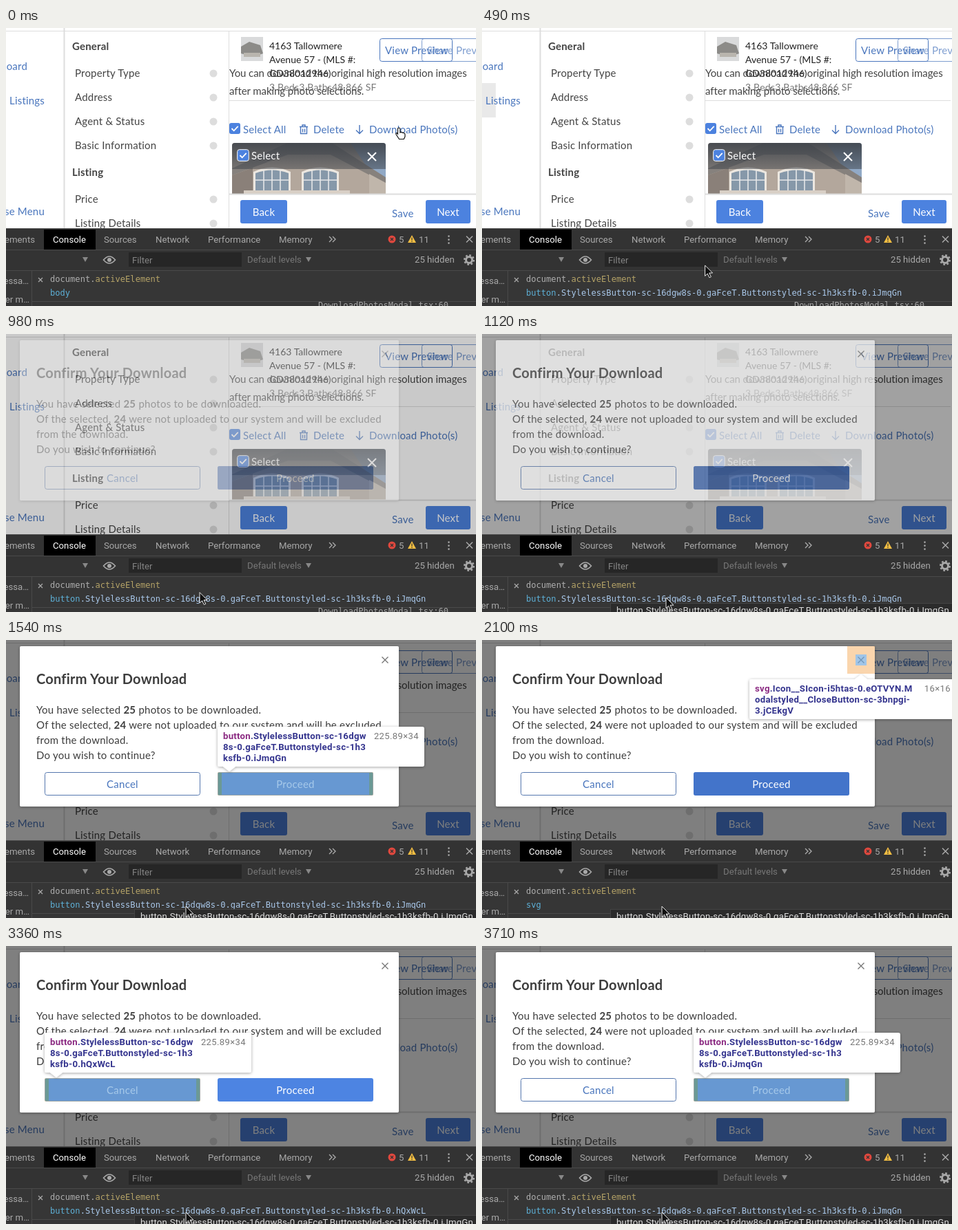
An HTML page that plays this animation: 682 by 404 pixels, repeating every 3780 ms.

```html
<!DOCTYPE html>
<html lang="en">
<head>
<meta charset="utf-8">
<title>Download dialog focus</title>
<style>
html, body { margin: 0; width: 100%; height: 100%; overflow: hidden; background: #fff; }
svg { display: block; }
text { white-space: pre; }
.page { font: 15px Lato, sans-serif; letter-spacing: .2px; fill: #444; }
.bold { font-weight: 700; }
.blue { fill: #4a76bd; }
.white { fill: #fff; }
.mid { text-anchor: middle; }
.end { text-anchor: end; }
.addr { font-size: 14px; letter-spacing: 0; fill: #222; }
.facts { font-size: 14px; fill: #777; }
.body { letter-spacing: -.08px; }
.modal { font: 15px Lato, sans-serif; letter-spacing: .25px; fill: #3d3d3d; }
.title { font-size: 20px; font-weight: 700; letter-spacing: .25px; }
.ui { font: 13.2px Roboto, sans-serif; fill: #a9a9a9; }
.mono { font: 12.08px "DejaVu Sans Mono", monospace; fill: #a9c8ea; }
.tag { fill: #5db0d7; }
.tip { font: 13.2px Roboto, sans-serif; }
.long { letter-spacing: .17px; }
.sel { font: 700 13.2px Roboto, sans-serif; letter-spacing: .27px; fill: #34348e; }
.el { fill: #8b2a82; }
.dim { font: 13px Roboto, sans-serif; letter-spacing: .4px; fill: #777; }
.line { fill: none; stroke: #ddd; }
.icon { fill: none; stroke: #4a76bd; stroke-width: 1.4; }
.btn { fill: #4c82df; }
</style>
</head>
<body>
<svg width="682" height="404" viewBox="0 0 682 404">
<defs>
  <linearGradient id="shade" x2="0" y2="1">
    <stop stop-color="#3c4148" stop-opacity=".9"/><stop offset="1" stop-color="#3c4148" stop-opacity=".5"/>
  </linearGradient>
  <filter id="shadow" x="-10%" y="-20%" width="120%" height="150%">
    <feDropShadow dx="0" dy="1" stdDeviation="2" flood-opacity=".35"/>
  </filter>
  <clipPath id="photo"><path d="M328 242V171q0-4 4-4h215q4 0 4 4v71z"/></clipPath>
  <g id="check">
    <rect width="16" height="16" rx="3" fill="#4c82df"/>
    <path d="M3.5 8l3.2 3.3 6-6.5" fill="none" stroke="#fff" stroke-width="1.8"/>
  </g>
  <g id="window">
    <path d="M-3 35V8q27-13 54 0v27z" fill="#ece7e0"/>
    <path d="M0 35V10q24-9 48 0v25z" fill="#8698a9"/>
    <path d="M24 4v31M12 6v29M36 6v29M0 20h48" stroke="#e6e8e9" stroke-width="1.6"/>
  </g>
</defs>

<g class="page">
  <rect width="682" height="292" fill="#fff"/>
  <path class="line" d="M0 4.5H682M324 105.5H680M323.5 5V291"/>
  <path class="line" d="M84.5 0V291" stroke-width="2"/>
  <rect id="hover" y="80" width="20" height="50" fill="#e9e9e9"/>
  <text class="blue end" x="31" y="61">Dashboard</text>
  <text class="blue" x="5" y="111">Listings</text>
  <text class="blue end" x="56" y="272">Close Menu</text>
  <text class="bold" x="96" y="32">General</text>
  <text class="bold" x="96" y="215">Listing</text>
  <g id="menu"></g>

  <rect x="341" y="13" width="32" height="35" fill="#d9dadb"/>
  <path d="M341 27l12-7 16 5 4 12-14 5-18-5z" fill="#8c8b88"/>
  <path d="M345 36h24v6h-24z" fill="#b9b5ae"/>
  <text class="addr" x="382" y="31">4163 Tallowmere</text>
  <text class="addr" x="382" y="51">Avenue 57 - (MLS #:</text>
  <text class="addr" x="382" y="71">GD38012946)</text>
  <text class="facts" x="382" y="91">3 Beds3 Baths48,866 SF</text>
  <text class="body" x="324" y="71">You can download the original high resolution images</text>
  <text class="body" x="324" y="97">after making photo selections.</text>
  <rect x="542.5" y="15.5" width="105" height="33" rx="3" fill="none" stroke="#4a76bd"/>
  <text class="blue" x="550" y="38">View Preview</text>
  <g opacity=".7">
    <rect x="603.5" y="15.5" width="110" height="33" rx="3" fill="none" stroke="#4a76bd"/>
    <text class="blue" x="611" y="38">Share Preview</text>
  </g>

  <use href="#check" x="324" y="138"/>
  <text class="blue" x="344" y="153">Select All</text>
  <path class="icon" d="M426 143.5h12M430 143v-2h4v2M427.5 144v9.5h9V144M430.5 146.5v5M433.5 146.5v5"/>
  <text class="blue" x="446" y="153">Delete</text>
  <path class="icon" d="M513 141v12M508 148.5l5 5 5-5"/>
  <text class="blue" x="527" y="153">Download Photo(s)</text>

  <g clip-path="url(#photo)">
    <rect x="328" y="167" width="223" height="75" fill="#b3a79c"/>
    <path d="M500 167h51v75h-22v-32z" fill="#91a9c6"/>
    <path d="M328 204l80-37h65l78 50v9l-80-42h-62l-81 30z" fill="#86817d"/>
    <path d="M328 214l30-11v39h-30z" fill="#8a8079"/>
    <path d="M527 212l24 13v17h-24z" fill="#c0b6ab"/>
    <path d="M345 236h154v6H345z" fill="#d8cfc5"/>
    <use href="#window" x="362" y="201"/>
    <use href="#window" x="432" y="201"/>
    <rect x="328" y="167" width="223" height="38" fill="url(#shade)"/>
  </g>
  <use href="#check" x="336" y="177"/>
  <rect x="335.7" y="176.7" width="16.6" height="16.6" rx="3" fill="none" stroke="#fff"/>
  <text class="white" x="356" y="191">Select</text>
  <path d="M525 181l12 12m0-12l-12 12" stroke="#fff" stroke-width="2"/>

  <path class="line" d="M324 241.5H682" stroke-width="2"/>
  <rect class="btn" x="340" y="250" width="68" height="34" rx="3"/>
  <text class="white mid" x="374" y="273">Back</text>
  <text class="blue" x="560" y="275">Save</text>
  <rect class="btn" x="609" y="250" width="65" height="34" rx="3"/>
  <text class="white mid" x="641.5" y="273">Next</text>
</g>

<rect id="veil" width="682" height="292"/>

<g id="modal" class="modal">
  <rect x="20" y="9" width="550" height="233" rx="2" fill="#fff" filter="url(#shadow)"/>
  <path d="M545.5 24.5l9 9m0-9l-9 9" stroke="#777" stroke-width="1.4"/>
  <text class="title" x="44" y="64">Confirm Your Download</text>
  <text x="44" y="107">You have selected <tspan class="bold">25</tspan> photos to be downloaded.</text>
  <text x="44" y="129">Of the selected, <tspan class="bold">24</tspan> were not uploaded to our system and will be excluded</text>
  <text x="44" y="151">from the download.</text>
  <text x="44" y="173">Do you wish to continue?</text>
  <rect x="56.5" y="192.5" width="225" height="33" rx="3" fill="#fff" stroke="#5577ae"/>
  <text class="blue mid" x="169" y="215">Cancel</text>
  <g id="cancelFocus">
    <rect x="56" y="192" width="226" height="34" rx="3" fill="#3b66b4"/>
    <text class="white mid" x="169" y="215">Cancel</text>
  </g>
  <rect x="307" y="192" width="226" height="34" rx="3" fill="#4d84e2"/>
  <rect id="proceedFocus" x="307" y="192" width="226" height="34" rx="3" fill="#3b66b4"/>
  <text class="white mid" x="420" y="215">Proceed</text>
</g>

<g id="btnMark">
  <rect x="307.5" y="192.5" width="225" height="33" fill="none" stroke="#ffe599" stroke-opacity=".5"/>
  <path d="M308 193h224v32H308zM313 193v32h214v-32z" fill="#93c47d" fill-opacity=".55" fill-rule="evenodd"/>
  <rect x="313" y="193" width="214" height="32" fill="#7db0e0" fill-opacity=".68"/>
  <path d="M310 126h294q3 0 3 3v52q0 3-3 3H333l-9 7-9-7h-5q-3 0-3-3v-52q0-3 3-3z" fill="#fff" filter="url(#shadow)"/>
  <text class="sel" x="315" y="144"><tspan class="el">button</tspan>.StylelessButton-sc-16dgw</text>
  <text class="sel" x="315" y="160">8s-0.gaFceT.Buttonstyled-sc-1h3</text>
  <text class="sel" x="315" y="176">ksfb-0.<tspan id="markHash"></tspan></text>
  <text class="dim end" x="599" y="144">225.89×34</text>
</g>

<g id="svgMark">
  <path d="M530 9h40v40h-40zM542 21v16h16V21z" fill="#f6b26b" fill-opacity=".55" fill-rule="evenodd"/>
  <rect x="542" y="21" width="16" height="16" fill="#6fa8dc" fill-opacity=".66"/>
  <path d="M391 57h150l9-7 9 7h133v58H391q-3 0-3-3V60q0-3 3-3z" fill="#fff" filter="url(#shadow)"/>
  <text class="sel" x="396" y="75"><tspan class="el">svg</tspan>.Icon__SIcon-i5htas-0.eOTVYN.M</text>
  <text class="sel" x="396" y="91">odalstyled__CloseButton-sc-3bnpgi-</text>
  <text class="sel" x="396" y="107">3.jCEkgV</text>
  <text class="dim end" x="680" y="75">16×16</text>
</g>

<g class="ui">
  <rect y="291" width="682" height="113" fill="#363636"/>
  <rect y="291" width="682" height="61" fill="#333"/>
  <path d="M0 291.5H682M0 322.5H682M0 352.5H682M37.5 352V404M38 397.5H682" stroke="#4a4a4a"/>
  <rect x="55" y="293" width="75" height="29" fill="#000"/>
  <text class="end" x="42" y="312">Elements</text>
  <text class="white" x="68" y="312">Console</text>
  <text x="142" y="312">Sources</text>
  <text x="217" y="312">Network</text>
  <text x="293" y="312">Performance</text>
  <text x="396" y="312">Memory</text>
  <path d="M469 303l4 4-4 4m5-8l4 4-4 4" fill="none" stroke="#a9a9a9" stroke-width="1.4"/>
  <circle cx="560" cy="307" r="5.5" fill="#e0483e"/>
  <path d="M558 305l4 4m0-4l-4 4" stroke="#333" stroke-width="1.2"/>
  <text x="570" y="312">5</text>
  <path d="M589 301l6 11h-12z" fill="#f2bd42"/>
  <path d="M589 304.5v4m0 1v1.5" stroke="#333" stroke-width="1.2"/>
  <text x="599" y="312">11</text>
  <path d="M642.5 302.5v.1m0 4.9v.1m0 4.9v.1" stroke="#a9a9a9" stroke-width="2.6" stroke-linecap="round"/>
  <path d="M668 302.5l9 9m0-9l-9 9" stroke="#a9a9a9" stroke-width="1.5"/>

  <path d="M111 333h8l-4 7zM435 333h8l-4 7z" fill="#888"/>
  <path d="M141.5 337q8.5-10 17 0q-8.5 10-17 0z" fill="none" stroke="#a9a9a9" stroke-width="1.6"/>
  <circle cx="150" cy="337" r="3" fill="#a9a9a9"/>
  <rect x="178" y="326" width="164" height="21" fill="#262626"/>
  <text x="183" y="342" fill="#858585">Filter</text>
  <text x="350" y="341" fill="#777">Default levels</text>
  <text x="593" y="341">25 hidden</text>
  <circle cx="672" cy="337" r="4.5" fill="none" stroke="#a9a9a9" stroke-width="3"/>
  <circle cx="672" cy="337" r="6.8" fill="none" stroke="#a9a9a9" stroke-width="2.4" stroke-dasharray="2.67"/>

  <text class="end" x="33" y="372">messa…</text>
  <text class="end" x="34" y="399">user m…</text>
  <path d="M47 363l6 6m0-6l-6 6" stroke="#a9a9a9" stroke-width="1.3"/>
  <text class="mono" id="expr" x="64" y="369"><tspan fill="#d6d6d6">document.</tspan><tspan fill="#e0c878">activeElement</tspan></text>
  <text class="mono" x="64" y="389"><tspan class="tag" id="tag"></tspan><tspan id="rest"></tspan></text>
  <text class="mono" x="453" y="407" style="fill:#a5a5a5">DownloadPhotosModal.tsx:60</text>
</g>

<g id="exprTip" class="tip" opacity=".85">
  <rect x="331.5" y="365.5" width="164" height="25" fill="#2b2b2b" stroke="#444"/>
  <text x="340" y="382" fill="#ddd">document.activeElement</text>
</g>
<g id="nodeTip" class="tip">
  <rect x="186.5" y="391.5" width="500" height="20" fill="#2b2b2b" stroke="#444"/>
  <text class="long" x="195" y="406" fill="#ddd">button.StylelessButton-sc-16dgw8s-0.gaFceT.Buttonstyled-sc-1h3ksfb-0.iJmqGn</text>
</g>

<g id="cursor">
  <path id="hand" d="M-1.5 1q0-2 1.7-2t1.7 2v5l1.3-.8 1.6 1 1.5-.4 1.3 1.2q1.4 0 1.4 1.8v3l-1.700 3.700H.5L-4 8.500q-.7-1.800 1-2l1.500 1.500z" fill="#fff" stroke="#111" stroke-width="1.2"/>
  <path id="beam" d="M-3-6.500q3 0 3 2q0-2 3-2M0-4.500v9M-3 6.500q3 0 3-2q0 2 3 2M-2 1h4" fill="none" stroke="#fff" stroke-width="1.5"/>
  <path id="arrow" d="M0 0v15.500l3.600-3.400 2.700 5.700 2.500-1.100-2.700-5.600h4.900z" fill="#111" stroke="#e8e8e8"/>
</g>
</svg>
<script>
const LOOP = 3780, STEP = 70;
const $ = id => document.getElementById(id);

const rows = [["Property Type", 66], ["Address", 101], ["Agent & Status", 136],
  ["Basic Information", 171], ["Price", 249], ["Listing Details", 284]];
$("menu").innerHTML = rows.map(([label, y]) =>
  `<text x="100" y="${y + 5}">${label.replace("&", "&amp;")}</text>
   <circle cx="301" cy="${y}" r="5.5" fill="#ddd"/>`).join("");

const styled = hash => `.StylelessButton-sc-16dgw8s-0.gaFceT.Buttonstyled-sc-1h3ksfb-0.${hash}`;
const HASH = { proceed: "iJmqGn", cancel: "hQxWcL" };

// [time, focused element]
const focus = [[0, "body"], [420, "proceed"], [2030, "svg"], [2940, "cancel"], [3500, "proceed"]];
// [time, x, y]
const path = [[0, 570, 146], [210, 570, 146], [560, 295, 368], [910, 295, 368],
  [1050, 267, 383], [1190, 267, 383], [1330, 261, 387], [LOOP, 261, 387]];

const ramp = (t, a, b) => Math.min(1, Math.max(0, (t - a) / (b - a)));
const within = (t, a, b) => t >= a && t < b;
const show = (id, on) => { $(id).style.display = on ? "" : "none"; };
const fade = (id, k) => { $(id).style.opacity = k; };

function pointAt(t) {
  const i = Math.max(1, path.findIndex(p => p[0] > t));
  const [a, b] = [path[i - 1], path[i]];
  const k = ramp(t, a[0], b[0]), e = k * k * (3 - 2 * k);
  return [a[1] + (b[1] - a[1]) * e, a[2] + (b[2] - a[2]) * e];
}

function render(t) {
  const who = focus.filter(f => f[0] <= t).pop()[1];
  const hash = HASH[who];
  $("tag").textContent = hash ? "button" : who;
  $("rest").textContent = hash ? styled(hash) : "";

  fade("veil", 0.5 * ramp(t, 787, 1239));
  fade("modal", ramp(t, 840, 1260));
  fade("proceedFocus", 1 - ramp(t, 2030, 2170) + ramp(t, 3430, 3570));
  fade("cancelFocus", ramp(t, 2680, 2880) - ramp(t, 3430, 3640));

  show("btnMark", hash && t >= 1260);
  $("btnMark").setAttribute("transform", `translate(${who === "cancel" ? -251 : 0})`);
  $("markHash").textContent = hash || "";
  show("svgMark", who === "svg");

  const onExpr = within(t, 560, 980);
  show("hover", within(t, 490, 980));
  fade("expr", onExpr ? 1 : 0.75);
  show("exprTip", within(t, 770, 980));
  show("nodeTip", t >= 1050);

  const [x, y] = pointAt(t);
  $("cursor").setAttribute("transform", `translate(${x} ${y})`);
  show("hand", t < 280);
  show("beam", onExpr);
  show("arrow", t >= 280 && !onExpr);
}

function tick() {
  const t = performance.now() % LOOP;
  render(Math.floor(t / STEP) * STEP);
  requestAnimationFrame(tick);
}
tick();
</script>
</body>
</html>
```
